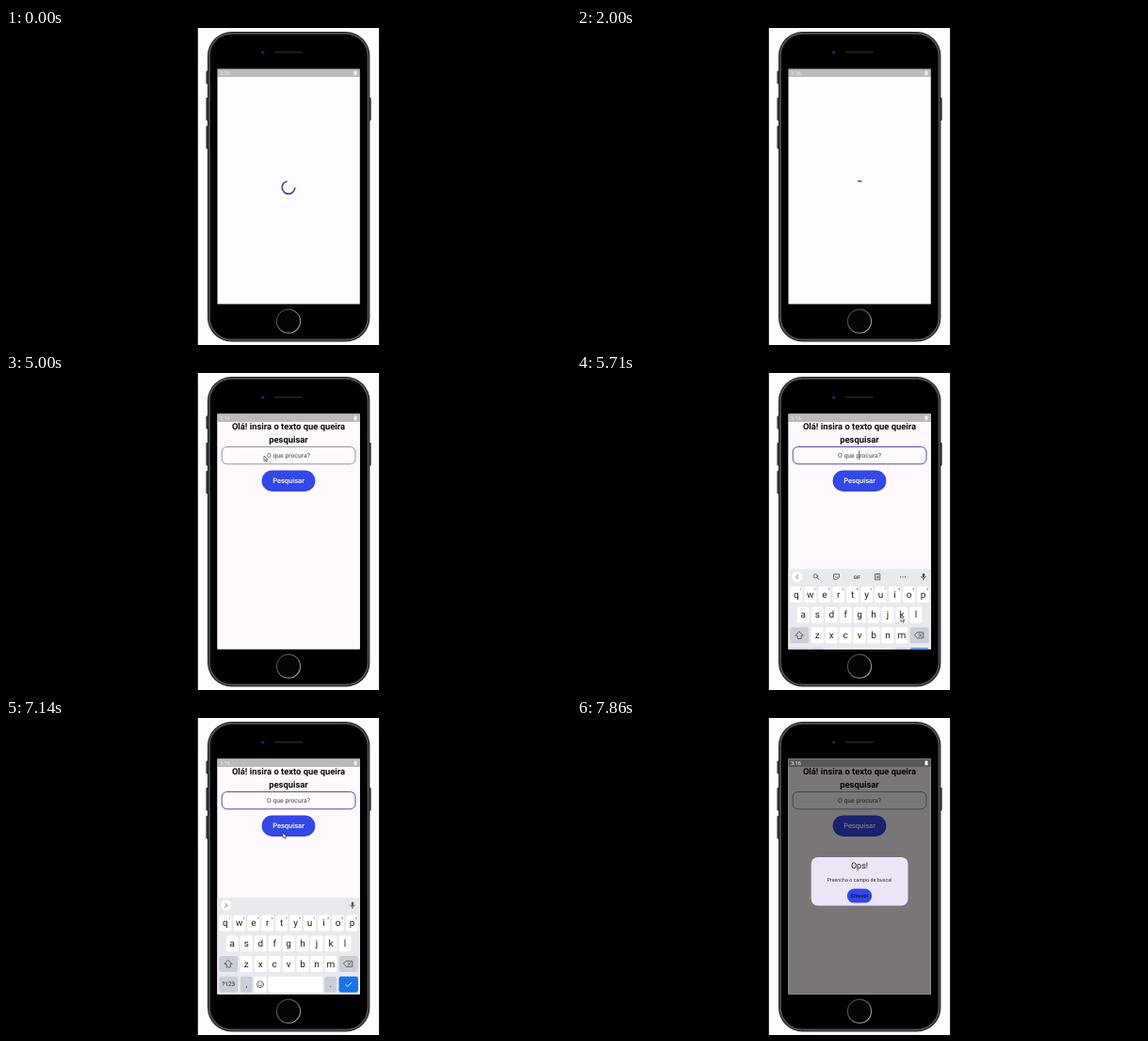
Recreate the animation shown at these times as an HTML page. Size 600 px wide and 337 px high, loop 8 s.

```html
<!DOCTYPE html>
<html lang="pt">
<head>
<meta charset="utf-8">
<title>Pesquisa</title>
<style>
  html, body { margin: 0; width: 100%; height: 100%; overflow: hidden; background: #000; }
  svg { display: block; width: 100vw; height: 100vh; }
  text { font-family: Roboto, Arial, sans-serif; text-anchor: middle; text-rendering: geometricPrecision; }
  .icon { fill: none; stroke: #4a4d52; stroke-width: .8; stroke-linecap: round; stroke-linejoin: round; }
  .dots { stroke-width: 1.2; }
  .mic { stroke-width: 2.4; }
</style>
</head>
<body>
<svg viewBox="0 0 600 337">
  <defs>
    <clipPath id="glass"><rect x="224.5" y="43.5" width="151.3" height="250"/></clipPath>
    <linearGradient id="ring" x1="0" y1="0" x2="1" y2="1">
      <stop offset="0" stop-color="#333"/><stop offset=".5" stop-color="#666"/><stop offset="1" stop-color="#bbb"/>
    </linearGradient>
  </defs>

  <rect width="600" height="337"/>
  <rect x="203.8" width="192.3" height="337" fill="#fefcff"/>
  <g fill="#363c3f">
    <rect x="212.4" y="45.5" width="3" height="14" rx="1"/>
    <rect x="212.4" y="74" width="3" height="24.5" rx="1"/>
    <rect x="212.4" y="104" width="3" height="24.5" rx="1"/>
    <rect x="384.7" y="74" width="3" height="24.5" rx="1"/>
  </g>
  <rect x="214" y="4" width="172.4" height="329.4" rx="25.5" fill="#1b1f21"/>
  <rect x="215.9" y="5.9" width="168.6" height="325.6" rx="23.7" fill="#000" stroke="#4b5255" stroke-width="1.8"/>
  <circle cx="272.8" cy="26" r="2" fill="#11133a"/>
  <circle cx="272.6" cy="25.8" r=".9" fill="#30389a"/>
  <rect x="285" y="25" width="30" height="1.6" rx=".8" fill="#252525"/>
  <circle cx="300" cy="311.7" r="12.6" fill="#050505" stroke="url(#ring)" stroke-width="1.1"/>

  <g clip-path="url(#glass)">
    <rect x="224" y="43" width="153" height="251" fill="#fefcff"/>
    <circle id="spinner" cx="300" cy="169.6" r="6.8" fill="none" stroke="#41479c" stroke-width="1.6" pathLength="360"/>
    <g id="page">
      <rect x="224" y="43" width="153" height="251" fill="#fff8fc"/>
      <g font-size="9.38" font-weight="700" fill="#0c0a0c">
        <text x="300" y="60.3">Olá! insira o texto que queira</text>
        <text x="300" y="73.6">pesquisar</text>
      </g>
      <rect id="field" x="229.2" y="78.5" width="141.8" height="18.3" rx="5.5" fill="#fffafd"/>
      <text x="300" y="90.1" font-size="6.8" font-weight="500" fill="#6a686a">O que procura?</text>
      <rect id="caret" x="299.4" y="82.5" width=".8" height="10" fill="#3a3a60"/>
      <rect x="271.6" y="103.5" width="56.8" height="22.4" rx="11.2" fill="#3348e6"/>
      <text x="300" y="117.2" font-size="7.5" font-weight="500" fill="#fff">Pesquisar</text>
    </g>
    <rect x="224" y="43" width="153" height="9" fill="#000" opacity=".26"/>
    <rect id="dim" x="224" y="43" width="153" height="251"/>
    <g id="dialog">
      <rect x="248.7" width="102.8" height="51.6" rx="7" fill="#ebe5f6"/>
      <text x="300" y="11.8" font-size="9" fill="#222">Ops!</text>
      <text x="300" y="26.1" font-size="5.36" fill="#333">Preencha o campo de busca!</text>
      <rect x="286.8" y="33.6" width="26.4" height="15" rx="7.5" fill="#3348e6"/>
      <text x="300" y="43" font-size="5.3" font-weight="500" fill="#0d0e33">Entendi</text>
    </g>
    <g id="status" fill="#fff">
      <text x="232.4" y="49.9" font-size="5.6">3:16</text>
      <rect x="369.5" y="45.4" width="3" height="4.8" rx=".5"/>
    </g>
    <g id="keyboard">
      <rect x="224" y="191" width="153" height="120" fill="#e8eaef"/>
      <circle cx="233.8" cy="199.2" r="5.6" fill="#fff"/>
      <path id="chevron" class="icon" d="M1-2L-1 0L1 2"/>
      <g id="tools" class="icon">
        <circle cx="253.2" cy="198.4" r="2.1"/><path d="M254.8 200l2 2"/>
        <path d="M273 196.4h5.4v3.4l-2 2h-3.4zM274.4 199.4q1.2 1.4 2.6 0"/>
        <path d="M316.8 196.4h5v6h-5zM318.2 196.2h2.2M318 198.8h2.6M318 200.4h2.6"/>
        <path class="dots" d="M343.6 199.4h.1M346 199.4h.1M348.4 199.4h.1"/>
        <text x="297.2" y="201.2" font-size="5" font-weight="700" fill="#4a4d52" stroke="none">GIF</text>
      </g>
      <path class="icon mic" d="M368 196.8v2"/>
      <path class="icon" d="M365.6 199q2.4 4.4 4.8 0M368 201.2v1.4"/>
    </g>
  </g>
  <path id="pointer" d="M0 0V5.6L1.4 4.4L2.4 6.4L3.3 6L2.4 4H4Z" fill="#fff" stroke="#222" stroke-width=".6"/>
</svg>
<script>
const LOOP = 8000, STEP = 1000 / 7, NS = 'http://www.w3.org/2000/svg';
const $ = id => document.getElementById(id);
const keyboard = $('keyboard');

function add(tag, attrs, text) {
  const el = document.createElementNS(NS, tag);
  for (const k in attrs) el.setAttribute(k, attrs[k]);
  if (text) el.textContent = text;
  keyboard.append(el);
}

function key(cx, cy, width, label = '', fill = '#fff', size = 10) {
  add('rect', { x: cx - width / 2, y: cy - 8.5, width, height: 17, rx: 2.2, fill });
  if (label) add('text', { x: cx, y: cy + size * .32, 'font-size': size, fill: '#202124' }, label);
}

const icon = d => add('path', { d, class: 'icon' });
const GREY = '#cbced6';

[['qwertyuiop', 232.9, 218], ['asdfghjkl', 240.3, 239.8], ['zxcvbnm', 255.2, 261.4]].forEach(([row, x, y], r) => {
  [...row].forEach((letter, i) => {
    const cx = x + i * 14.95;
    key(cx, y, 12.9, letter);
    if (!r) add('text', { x: cx + 4.7, y: y - 4.2, 'font-size': 3.6, fill: '#55585c' }, String((i + 1) % 10));
  });
});
key(236.2, 261.4, 20, '', GREY);
icon('M236.2 257.6l4 4h-2v3.4h-4v-3.4h-2z');
key(363.7, 261.4, 20, '', GREY);
icon('M361.4 258.4h6.4v6h-6.4l-2.6-3zM363.2 260l2.8 2.8M366 260l-2.8 2.8');
key(236.2, 283.2, 20, '?123', GREY, 6.4);
key(255.2, 283.2, 12.9, ',', GREY, 8);
key(270, 283.2, 12.9);
add('circle', { cx: 270, cy: 283.2, r: 3.5, class: 'icon' });
icon('M268.7 282.2v.2M271.3 282.2v.2M268.2 284.2q1.8 2.2 3.6 0');
key(307.4, 283.2, 57.8);
key(344.7, 283.2, 12.9, '.', GREY, 8);
key(363.7, 283.2, 20.4, '', '#1a73e8');
add('path', { d: 'M360.6 283.4l2.1 2.1l4.2-4.4', fill: 'none', stroke: '#fff', 'stroke-width': .9 });

// Piecewise-linear lookup in rows of [time, ...values].
function track(rows, t) {
  const i = rows.findIndex(row => row[0] > t);
  if (i < 0) return rows.at(-1).slice(1);
  if (!i) return rows[0].slice(1);
  const a = rows[i - 1], b = rows[i], k = (t - a[0]) / (b[0] - a[0]);
  return a.slice(1).map((v, j) => v + (b[j + 1] - v) * k);
}

// cubic-bezier(.4, 0, .2, 1)
function ease(x) {
  let lo = 0, hi = 1;
  for (let i = 0; i < 20; i++) {
    const s = (lo + hi) / 2, r = 1 - s;
    if (1.2 * r * r * s + .6 * r * s * s + s ** 3 < x) lo = s; else hi = s;
  }
  return lo * lo * (3 - 2 * lo);
}

const POINTER = [[4000, 368, 240], [4430, 330, 160], [4860, 276, 90], [5000, 274, 88], [5290, 300, 90],
  [5710, 344, 259], [6140, 345, 258], [6570, 335, 220], [7140, 294, 122], [7430, 291, 122]];
const KEYBOARD_Y = [[5430, 104], [5570, 66], [5710, 18], [5850, 0], [7570, 0], [7710, 50], [7850, 104]];

function drawSpinner(t) {
  const ms = t < 2000 ? t : t < 3140 ? 2000 : t < 3280 ? 2045 : 2090;
  const phase = .31 + ms / 1333, turn = Math.floor(phase), p = phase - turn;
  const grow = ease(Math.min(1, p * 2)), shrink = ease(Math.max(0, p * 2 - 1));
  const tail = 576 * turn + 291.6 * p + 284.4 * shrink - 90.4;
  const sweep = 284.4 * (grow - shrink) + 3.6;
  $('spinner').setAttribute('stroke-dasharray', `${sweep} ${360 - sweep}`);
  $('spinner').setAttribute('transform', `rotate(${tail} 300 169.6)`);
}

const show = (id, on) => $(id).setAttribute('visibility', on ? 'visible' : 'hidden');
const move = (id, x, y) => $(id).setAttribute('transform', `translate(${x} ${y})`);

function draw(now) {
  const t = Math.floor(((now % LOOP) + 5) / STEP) * STEP % LOOP;
  const loaded = t > 3700, focused = t > 5280 && t < 7700, modal = t > 7420;
  drawSpinner(t);
  show('spinner', !loaded);
  show('page', loaded);
  show('caret', focused && !modal && (t - 5280) % 1000 < 500);
  $('field').setAttribute('stroke', focused ? '#544ea8' : '#77818a');
  $('field').setAttribute('stroke-width', focused ? 1 : .8);

  $('dim').setAttribute('opacity', !modal ? 0 : t < 7560 ? .3 : .52);
  $('dialog').setAttribute('opacity', !modal ? 0 : t < 7560 ? .6 : 1);
  move('dialog', 0, t < 7700 ? 96.2 : 148);
  $('status').setAttribute('opacity', modal ? 1 : .75);

  move('keyboard', 0, track(KEYBOARD_Y, t)[0]);
  const open = t > 5280 && t < 6560;
  show('tools', open);
  $('chevron').setAttribute('transform', `translate(233.8 199.2) scale(${open ? 1 : -1} 1)`);

  show('pointer', t > 3990 && t < 7560);
  move('pointer', ...track(POINTER, t));
}

const start = performance.now();
(function tick() {
  draw(performance.now() - start);
  requestAnimationFrame(tick);
})();
</script>
</body>
</html>
```
